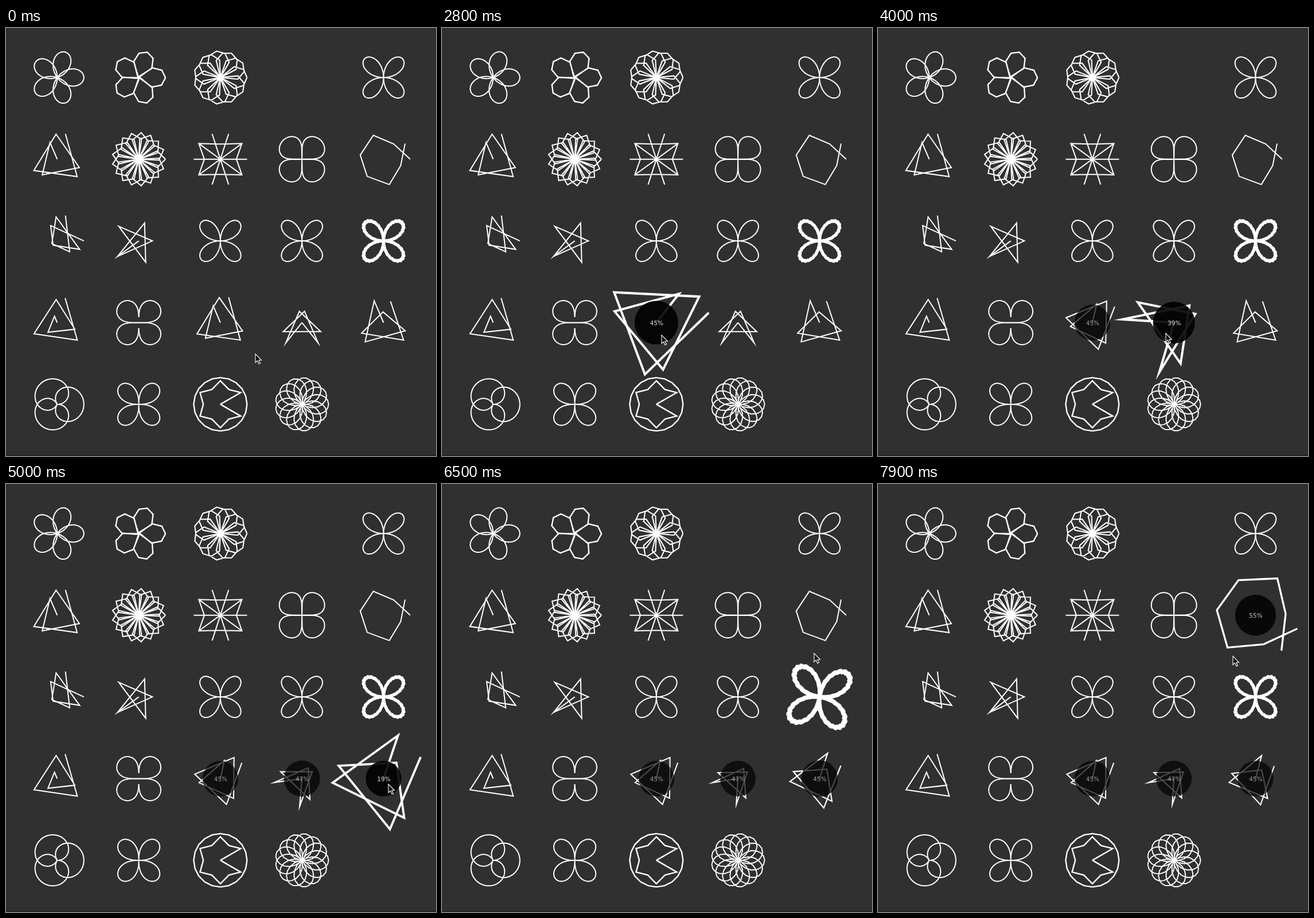
Write an HTML page with a canvas that moves like this. It is 750x746 px and loops after 8000 ms.

```html
<!DOCTYPE html>
<html lang="en">
<head>
<meta charset="utf-8">
<title>Rose grid</title>
<style>
  html, body { margin: 0; width: 100%; height: 100%; overflow: hidden; background: #303030; }
  canvas { display: block; width: 100vw; height: 100vh; }
</style>
</head>
<body>
<canvas id="stage" width="750" height="746"></canvas>
<script>
const ctx = document.getElementById('stage').getContext('2d');
const LOOP = 8000, RADIUS = 46.5, DEG = Math.PI / 180;
const clamp = v => Math.max(0, Math.min(1, v));
const sin = deg => Math.sin(deg * DEG);
const cos = deg => Math.cos(deg * DEG);

// Joins `count` chords of a polar curve, one every `step` degrees.
function plot(radiusAt, step, count) {
  const path = new Path2D();
  for (let i = 0; i <= count; i++) {
    const a = i * step, r = RADIUS * radiusAt(a);
    path.lineTo(r * cos(a), -r * sin(a));
  }
  return path;
}

// Polar radii: every lobe on its own side, or negative lobes turned round.
const lobes = (wave, k, power = 1) => a => Math.abs(wave(k * a)) ** power;
const loops = (k, power = 1) => a => {
  const c = cos(k * a);
  return Math.sign(c) * Math.abs(c) ** power;
};

const clover = power => plot(lobes(sin, 2, power), 1, 360);
const triangle = (wave, k, power) => plot(lobes(wave, k, power), 792 / 7, 7);

function wheel() {
  const path = plot(a => Math.abs(cos(a)) > 0.5 && a % 180 ? 1 : 0.6, 36, 10);
  path.addPath(plot(a => a % 72 ? 0 : 1, 36, 10));
  path.addPath(plot(a => a % 72 ? 1 : 0, 36, 10));
  return path;
}

function starRing() {
  const path = plot(() => 1, 18, 20);
  path.addPath(plot(a => a % 360 === 0 ? 0 : a % 60 ? 0.88 : 0.64, 30, 12));
  return path;
}

// [column, row, path, line width]
const shapes = [
  [0, 0, plot(loops(5 / 3), 3, 360), 2],
  [1, 0, plot(loops(5 / 3, 0.7), 17.99, 120), 2.2],
  [2, 0, plot(loops(11 / 7, 0.6), 210 / 11, 66), 2.1],
  [4, 0, clover(1), 2],
  [0, 1, triangle(sin, 5 / 44, 0.25), 2],
  [1, 1, plot(loops(17 / 9, 0.8), 405 / 17, 68), 2],
  [2, 1, wheel(), 2],
  [3, 1, clover(0.25), 2],
  [4, 1, plot(lobes(cos, 15 / 11, 0.25), 396 / 7, 7), 2],
  [0, 2, triangle(cos, 25 / 22), 2],
  [1, 2, plot(lobes(sin, 35 / 72, 0.5), 216, 6), 2],
  [2, 2, clover(1), 2],
  [3, 2, clover(1), 2],
  [4, 2, plot(a => 0.97 * sin(2 * a) + 0.02 * sin(57 * a), 1, 360), 5.5],
  [0, 3, triangle(sin, 15 / 113), 2],
  [1, 3, plot(lobes(sin, 2, 0.36), 180 / 201, 402), 2],
  [2, 3, triangle(sin, 5 / 44, 0.25), 2],
  [3, 3, plot(lobes(sin, 1 / 3), 1620 / 7, 7), 2],
  [4, 3, triangle(sin, 0.407, 0.35), 2],
  [0, 4, plot(lobes(cos, 3 / 4, 0.85), 3, 240), 2],
  [1, 4, clover(0.7), 2],
  [2, 4, starRing(), 2.4],
  [3, 4, plot(loops(13 / 9), 9, 360), 1.9]
];

// Pointer visits, keyed by "column,row"; rest is the angle kept afterwards.
const visits = {
  '2,3': { on: 1650, off: 2800, percent: 45, rest: 35.5 },
  '3,3': { on: 3250, off: 4100, percent: 47, rest: 42.3 },
  '4,3': { on: 4590, off: 5750, counted: 5255, percent: 45, rest: 38 },
  '4,2': { on: 6270, off: 6400, percent: 0, spin: 36, rest: 0 },
  '4,1': { on: 6600, off: 7750, percent: 55, rest: 40 }
};

// Pointer stops: [time, x, y]
const stops = [
  [1400, 435, 568], [1900, 378, 535], [2800, 383, 535], [3250, 502, 532],
  [4100, 502, 532], [4700, 667, 523], [5700, 667, 523], [6500, 649, 295],
  [7200, 642, 235], [7900, 619, 300]
];

const approach = (time, tau) => 1 - Math.exp(-time / tau);

function poseAt(visit, time) {
  if (!visit || time < visit.on) return { scale: 1, angle: 0, badge: 0 };
  const { on, off, counted = off, percent, spin = 65, rest } = visit;
  const held = Math.min(time, off) - on;
  const fade = Math.exp(-Math.max(0, time - off) / 345);
  return {
    scale: 1 + approach(held, 165) * fade,
    angle: rest + (spin * approach(held, 400) - rest) * fade,
    badge: percent && 31 + (38.5 * approach(held, 250) - 31) * fade,
    dim: 0.69 + 0.21 * fade,
    ink: 0.58 + 0.3 * fade,
    percent: Math.round(percent * clamp((time - on - 230) / (counted - on - 230)))
  };
}

function drawShape([column, row, path, width], time) {
  const pose = poseAt(visits[column + ',' + row], time);
  ctx.save();
  ctx.translate(89.3 + 142.3 * column, 86.3 + 142.4 * row);
  ctx.save();
  ctx.rotate(pose.angle * DEG);
  ctx.scale(pose.scale, pose.scale);
  ctx.lineWidth = width;
  ctx.strokeStyle = '#fff';
  ctx.stroke(path);
  ctx.restore();
  if (pose.badge > 0) {
    ctx.fillStyle = `rgba(0,0,0,${pose.dim})`;
    ctx.beginPath();
    ctx.arc(0, 0, pose.badge, 0, 2 * Math.PI);
    ctx.fill();
    ctx.fillStyle = `rgba(255,255,255,${pose.ink})`;
    ctx.fillText(pose.percent + '%', 0.5, 4.5);
  }
  ctx.restore();
}

function pointerAt(time) {
  let [, x, y] = stops[0];
  for (let i = 1; i < stops.length; i++) {
    const [from] = stops[i - 1], [to, nextX, nextY] = stops[i];
    const p = clamp((time - from) / (to - from));
    x += (nextX - x) * p;
    y += (nextY - y) * p;
  }
  return [x, y];
}

const arrow = new Path2D('M0 0V15L3.5 12 6 17.5 8.5 16.5 6 11H10.5Z');

function drawPointer(time) {
  ctx.save();
  ctx.translate(...pointerAt(time));
  ctx.fillStyle = '#111';
  ctx.strokeStyle = '#fff';
  ctx.lineWidth = 1.1;
  ctx.fill(arrow);
  ctx.stroke(arrow);
  ctx.restore();
}

function draw(time) {
  ctx.fillStyle = '#303030';
  ctx.fillRect(0, 0, 750, 746);
  ctx.fillStyle = '#272227';
  ctx.fillRect(0, 744, 750, 2);
  ctx.font = '10.5px "DejaVu Sans", sans-serif';
  ctx.textAlign = 'center';
  for (const shape of shapes) drawShape(shape, time);
  drawPointer(time);
}

const start = performance.now();
function tick() {
  const time = (performance.now() - start) % LOOP;
  draw(Math.floor(time / 100) * 100);
  requestAnimationFrame(tick);
}
tick();
</script>
</body>
</html>
```
